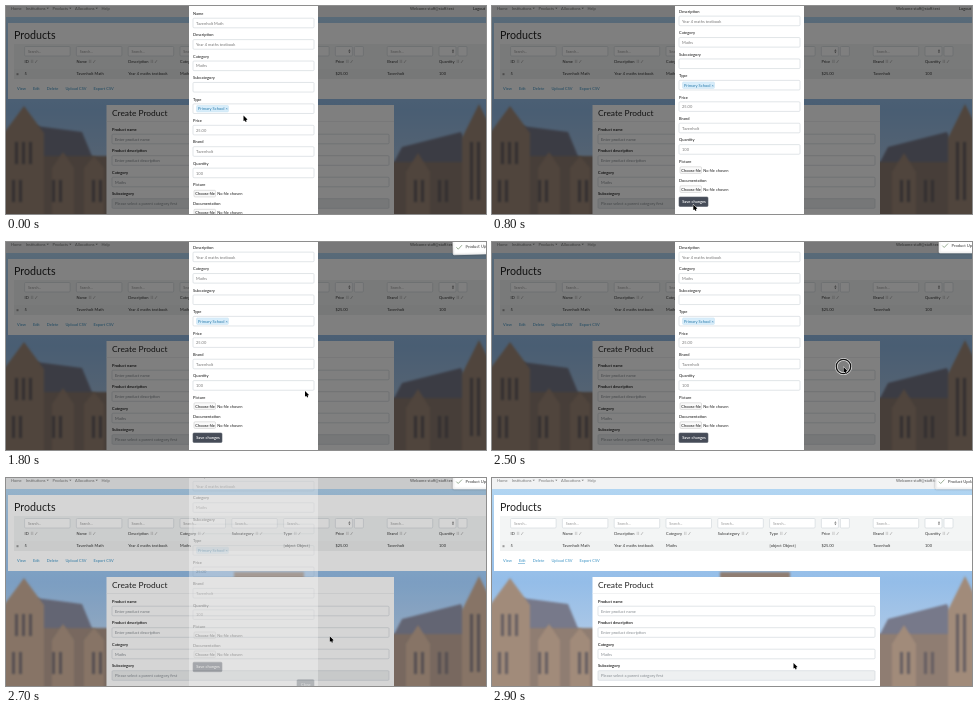
Write an HTML page with a canvas that moves like this. It is 480 px wide and 208 px high and loops after 3 s.

```html
<!DOCTYPE html>
<html lang="en">
<head>
<meta charset="utf-8">
<title>Edit product</title>
<style>
  html, body { margin: 0; width: 100%; height: 100%; overflow: hidden; }
  canvas { display: block; width: 480px; height: 208px; }
</style>
</head>
<body>
<canvas id="stage" width="480" height="208"></canvas>
<script>
const W = 480, H = 208, LOOP = 3000, STEP = 100;
const FONT = 'Lato, "Open Sans", sans-serif';
const BRAND = 'Tavenholt';
const ITEM = BRAND + ' Math';
const LINE = '#cdd3d8';
const CLICK = 2500, CLOSED = 2800;
const ctx = document.getElementById('stage').getContext('2d');

function makeLayer() {
  const canvas = document.createElement('canvas');
  canvas.width = W;
  canvas.height = H;
  return canvas.getContext('2d');
}

// Draws text centred on y and returns its width
function text(c, str, x, y, { size = 4, color = '#333', weight = 400 } = {}) {
  c.font = `${weight} ${size}px ${FONT}`;
  c.fillStyle = color;
  c.fillText(str, x, y + size * 0.35);
  return c.measureText(str).width;
}

function rect(c, fill, x, y, w, h) {
  c.fillStyle = fill;
  c.fillRect(x, y, w, h);
}

function box(c, x, y, w, h, fill = '#fff', line = LINE) {
  c.beginPath();
  c.roundRect(x, y, w, h, 1);
  c.fillStyle = fill;
  c.fill();
  c.strokeStyle = line;
  c.lineWidth = 0.6;
  c.stroke();
}

function poly(c, fill, ...pts) {
  c.beginPath();
  pts.forEach(([x, y]) => c.lineTo(x, y));
  c.closePath();
  c.fillStyle = fill;
  c.fill();
}

function stroke(c, color, lw, ...pts) {
  c.beginPath();
  pts.forEach(([x, y]) => c.lineTo(x, y));
  c.strokeStyle = color;
  c.lineWidth = lw;
  c.stroke();
}

// Small triangle; a negative height points up
function caret(c, x, y, h = 1.3) {
  poly(c, '#777', [x - 1.1, y], [x + 1.1, y], [x, y + h]);
}

function field(c, x, y, w, value, color = '#777', fill = '#fff') {
  box(c, x, y, w, 9.6, fill);
  text(c, value, x + 3, y + 5, { color });
}

// Photo: sky, two wings of a stone building and a tower top between the cards
function drawPhoto(c) {
  const stone = '#a18b7a', wall = '#8f7d72', roof = '#77798a', glass = '#665f62';
  const gable = (x, w, peak, eave) =>
    poly(c, stone, [x, H + 9], [x, eave], [x + w / 2, peak], [x + w, eave], [x + w, H + 9]);
  const windows = (x, n, y, h) => {
    for (let i = 0; i < n; i++) rect(c, glass, x + i * 7, y, 3, h);
  };

  const sky = c.createLinearGradient(0, 0, 0, H);
  sky.addColorStop(0, '#b5d8f3');
  sky.addColorStop(0.5, '#94bde8');
  sky.addColorStop(1, '#c3d2e4');
  rect(c, sky, 0, 0, W, H);

  c.save();
  c.filter = 'blur(1.2px)';
  rect(c, wall, 228, 94, 70, 10);

  poly(c, roof, [30, 120], [76, 126], [88, 155], [30, 155]);
  rect(c, wall, -4, 150, 106, 70);
  gable(-2, 40, 100, 127);
  gable(46, 22, 146, 162);
  gable(78, 20, 150, 162);
  windows(9, 3, 136, 22);
  for (let x = 6; x < 100; x += 40) windows(x, 2, 174, 22);

  poly(c, roof, [396, 141], [455, 126], [470, 160], [386, 160]);
  rect(c, wall, 386, 156, 98, 60);
  gable(400, 24, 147, 166);
  gable(456, 34, 98, 132);
  windows(464, 2, 136, 58);
  for (let x = 408; x < 450; x += 24) windows(x, 2, 174, 22);
  c.restore();
}

function drawNav(c) {
  rect(c, '#f1f2f3', 0, 0, W, 11);
  let x = 5;
  for (const name of ['Home', 'Institutions', 'Products', 'Allocations', 'Help']) {
    x += text(c, name, x, 2.3, { color: '#777' }) + 4;
    if (name.endsWith('s')) {
      caret(c, x - 1.8, 1.8);
      x += 3;
    }
  }
  text(c, 'Welcome staff@staff.test', 404, 2.3, { color: '#555' });
  text(c, 'Logout', 467, 2.3);
}

function drawTable(c) {
  rect(c, '#fff', 2, 17, 478, 76);
  text(c, 'Products', 8, 29.2, { size: 10.7, color: '#222' });
  rect(c, '#f3f5f5', 8, 38, 472, 25);
  rect(c, '#f0f2f2', 8, 63, 472, 10);

  const record = {
    ID: '5', Name: ITEM, Description: 'Year 4 maths textbook', Category: 'Maths', Subcategory: '',
    Type: '[object Object]', Price: '$25.00', Brand: BRAND, Quantity: '100'
  };
  Object.entries(record).forEach(([name, value], i) => {
    const x = 18.6 + i * 51.8;
    if (name === 'Price' || name === 'Quantity') {
      box(c, x, 40.5, 17, 9.5);
      box(c, x + 19, 40.5, 9, 9.5);
      caret(c, x + 14, 44.8, -1.6);
      caret(c, x + 14, 45.6, 1.6);
    } else {
      box(c, x, 40.5, 45.5, 9.5);
      text(c, 'Search...', x + 3.3, 45.3, { size: 3.6, color: '#999' });
    }
    const end = x + text(c, name, x, 55.5) + 2;
    for (const dx of [0.6, 2]) stroke(c, '#aaa', 0.5, [end + dx, 53.8], [end + dx, 57]);
    stroke(c, '#aaa', 0.7, [end + 4.4, 57], [end + 6.4, 54.2]);
    text(c, value, x, 68);
  });
  rect(c, '#999', 10.5, 67.2, 2, 2);

  let x = 11;
  for (const name of ['View', 'Edit', 'Delete', 'Upload CSV', 'Export CSV'])
    x += text(c, name, x, 83, { color: '#3c93c4' }) + 7;
}

function drawForm(c) {
  rect(c, '#fff', 100.5, 99, 287.5, 109);
  text(c, 'Create Product', 106, 107, { size: 8.4, color: '#222' });
  rect(c, '#e8eaec', 100.5, 115, 287.5, 0.6);
  const rows = {
    'Product name': 'Enter product name', 'Product description': 'Enter product description',
    Category: 'Maths', Subcategory: 'Please select a parent category first'
  };
  Object.entries(rows).forEach(([name, value], i) => {
    const y = 123.5 + i * 21.5;
    text(c, name, 106, y, { color: '#111', weight: 600 });
    field(c, 106, y + 4.7, 277, value, '#858b90', name === 'Subcategory' ? '#eef0f1' : '#fff');
  });
}

// Dialog, laid out in its unscrolled position and moved by shift
function drawDialog(c, shift) {
  c.clearRect(0, 0, W, H);
  rect(c, '#fff', 183, 0, 129, H);
  c.save();
  c.translate(0, shift);
  const label = (name, y) => text(c, name, 187, y, { color: '#222', weight: 500 });
  const rows = {
    Name: ITEM, Description: 'Year 4 maths textbook', Category: 'Maths', Subcategory: '',
    Type: '', Price: '25.00', Brand: BRAND, Quantity: '100'
  };
  Object.entries(rows).forEach(([name, value], i) => {
    const y = 7.5 + i * 21.42;
    label(name, y);
    field(c, 187, y + 4.7, 121, value);
    if (name === 'Type') {
      box(c, 190.5, y + 6.3, 32, 6.4, '#d8edfa', '#cbe5f4');
      text(c, 'Primary School ×', 192, y + 9.6, { color: '#2b7cab' });
    }
  });
  ['Picture', 'Documentation'].forEach((name, i) => {
    const y = 179 + i * 19;
    label(name, y);
    box(c, 188, y + 5.3, 21.5, 6.6, '#fafafa', '#ccc');
    text(c, 'Choose file', 189.3, y + 8.6, { color: '#111' });
    text(c, 'No file chosen', 211.3, y + 8.6, { color: '#222' });
  });
  box(c, 187, 214.5, 29, 9.5, '#464c58', '#5a606b');
  text(c, 'Save changes', 190.2, 219.3, { color: '#fff', weight: 600 });
  box(c, 291, 232, 17, 9.5, '#6c757d', '#6c757d');
  text(c, 'Close', 295, 237, { color: '#fff' });
  c.restore();
}

// Toast swings in with a damped wobble
function drawToast(t) {
  const p = Math.min(1, (t - 1650) / 500);
  const swing = Math.cos(p * 3 * Math.PI) * (1 - p);
  const x = t < CLOSED ? 447 : 443.5;
  ctx.save();
  ctx.translate(490, 3 - swing);
  ctx.rotate(swing * 0.04);
  ctx.translate(-490, -3);
  ctx.shadowColor = 'rgba(0,0,0,.35)';
  ctx.shadowBlur = 2;
  box(ctx, x, -6, 86, 17, '#fff', '#fff');
  ctx.shadowColor = 'transparent';
  stroke(ctx, '#8fa58a', 0.9, [x + 3.3, 3.6], [x + 5.2, 5.5], [x + 9, 1.6]);
  text(ctx, 'Product Updated', x + 12.5, 3.3, { size: 4.1, color: '#545454', weight: 600 });
  ctx.restore();
}

function drawCursor([x, y], clicking) {
  if (clicking) {
    ctx.beginPath();
    ctx.arc(x, y - 0.5, 7.2, 0, 7);
    for (const [color, lw] of [['rgba(255,255,255,.8)', 2.8], ['#111', 1.3]]) {
      ctx.strokeStyle = color;
      ctx.lineWidth = lw;
      ctx.stroke();
    }
  }
  const head = [[x, y], [x, y + 5.4], [x + 4, y + 3.9], [x, y]];
  const tail = [[x + 1.4, y + 3], [x + 2.6, y + 6.2]];
  stroke(ctx, '#fff', 1, ...head);
  stroke(ctx, '#fff', 2, ...tail);
  poly(ctx, '#000', ...head);
  stroke(ctx, '#000', 1.1, ...tail);
}

const progress = (t, from, to) => Math.min(1, Math.max(0, (t - from) / (to - from)));

// Each move: departure, arrival, destination
const moves = [
  [300, 800, 201.3, 198.5],
  [1200, 1800, 299, 149],
  [1900, 2400, 351.5, 125],
  [CLICK, 2900, 301.5, 185]
];
function pointerAt(t) {
  return moves.reduce(([x, y], [from, to, toX, toY]) => {
    const p = progress(t, from, to) ** 0.85;
    return [x + (toX - x) * p, y + (toY - y) * p];
  }, [237.5, 109.5]);
}

const page = makeLayer();
const dialog = makeLayer();
for (const draw of [drawPhoto, drawNav, drawTable, drawForm]) draw(page);

function render(t) {
  ctx.drawImage(page.canvas, 0, 0);
  const closing = progress(t, CLICK, CLOSED);
  if (closing < 1) {
    rect(ctx, `rgba(0,0,0,${0.5 * (1 - closing)})`, 0, 0, W, H);
    const scroll = t < 200 ? 0 : 23.5;
    drawDialog(dialog, -scroll - 13 * closing ** 1.6);
    ctx.globalAlpha = 1 - closing;
    ctx.drawImage(dialog.canvas, 0, 0);
    ctx.globalAlpha = 1;
  } else {
    rect(ctx, '#3c93c4', 26, 85.2, 7, 0.5);
  }
  if (t >= 1700) drawToast(t);
  drawCursor(pointerAt(t), t === 1000 || t === CLICK);
}

const start = performance.now();
function tick() {
  const elapsed = (performance.now() - start) % LOOP;
  render(Math.floor(elapsed / STEP) * STEP);
  requestAnimationFrame(tick);
}
tick();
</script>
</body>
</html>
```
